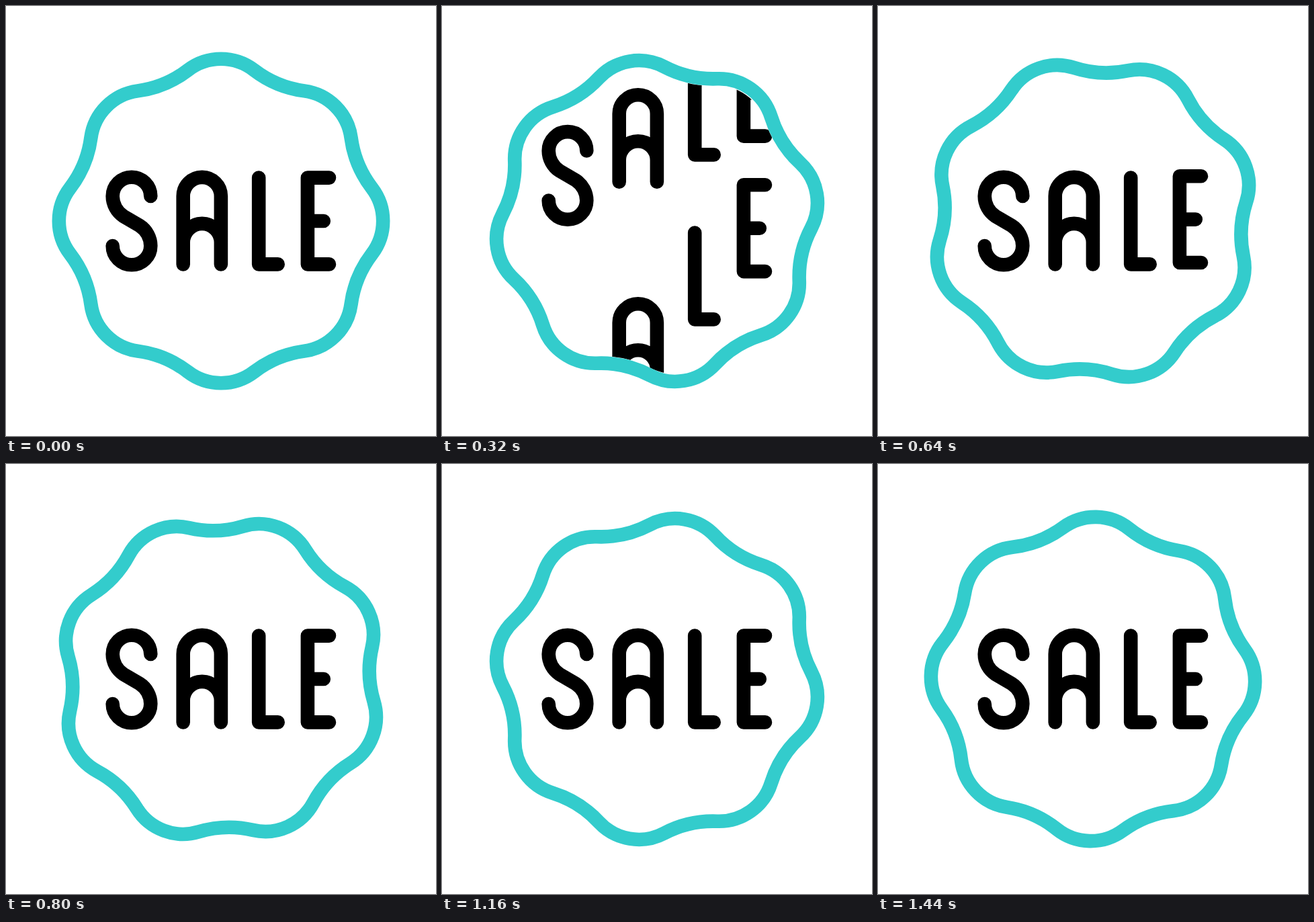
An HTML page without scripts for the animation above (1.48 s loop, 640x640 px).

```html
<!DOCTYPE html>
<html lang="en">
<head>
<meta charset="utf-8">
<title>Sale badge</title>
<style>
  @property --frame { syntax: "<number>"; inherits: true; initial-value: 0; }

  html, body { margin: 0; height: 100%; overflow: hidden; background: #fff; }

  /* One stepped clock drives every part. */
  svg {
    display: block;
    width: 100%;
    height: 100%;
    animation: clock 1480ms steps(37) -2ms infinite;
  }
  @keyframes clock { to { --frame: 37; } }

  path { fill: none; stroke-width: 20.6; stroke-linecap: round; stroke-linejoin: round; }
  .letter path { stroke: #000; }
  .ring { stroke: #3cc; }
  .spin { transform: rotate(calc(var(--frame) * -45deg / 37)); }
  .inset { transform: rotate(calc(var(--frame) * -45deg / 37)) scale(.952); }

  /* Smoothstep from --from, covering --way, starting at --start for --span frames. */
  .letter {
    --x: clamp(0, (var(--frame) - var(--start)) / var(--span), 1);
    --ease: (var(--x) * var(--x) * (3 - 2 * var(--x)));
    transform: translateY(calc(var(--from) + var(--way) * var(--ease)));
  }
  .out { --from: 0px; --way: 360px; --span: 9.7; }
  .in { --from: -326px; --way: 326px; --start: 1; }
</style>
</head>
<body>
<svg viewBox="-320 -320 640 640" role="img" aria-label="SALE">
  <defs>
    <path id="badge" d="M-49.3-224.5
      A81.2 81.2 0 0 1 49.3-224.5 A156.6 156.6 0 0 0 123.9-193.6
      A81.2 81.2 0 0 1 193.6-123.9 A156.6 156.6 0 0 0 224.5-49.3
      A81.2 81.2 0 0 1 224.5 49.3 A156.6 156.6 0 0 0 193.6 123.9
      A81.2 81.2 0 0 1 123.9 193.6 A156.6 156.6 0 0 0 49.3 224.5
      A81.2 81.2 0 0 1-49.3 224.5 A156.6 156.6 0 0 0-123.9 193.6
      A81.2 81.2 0 0 1-193.6 123.9 A156.6 156.6 0 0 0-224.5 49.3
      A81.2 81.2 0 0 1-224.5-49.3 A156.6 156.6 0 0 0-193.6-123.9
      A81.2 81.2 0 0 1-123.9-193.6 A156.6 156.6 0 0 0-49.3-224.5Z"/>
    <path id="s" d="M-104.7-37A28.3 28.3 0 0 0-161.3-37C-161.3-25-155-13.5-145-7L-121 7C-111 13.5-104.7 25-104.7 37A28.3 28.3 0 0 1-161.3 37"/>
    <path id="a" d="M-56.3 64.4V-37a28.1 28.1 0 0 1 56.2 0V64.4M-56.3 32a28.1 28.1 0 0 1 56.2 0"/>
    <path id="l" d="M56.2-64.4V64.4H84.7"/>
    <path id="e" d="M161-64.4H128.9V64.4H161M128.9 0H152.8"/>
    <clipPath id="inside"><use href="#badge" class="inset"/></clipPath>
  </defs>

  <g clip-path="url(#inside)" stroke="#000">
    <use href="#s" class="letter out" style="--start: 1"/>
    <use href="#a" class="letter out" style="--start: 3"/>
    <use href="#l" class="letter out" style="--start: 5"/>
    <use href="#e" class="letter out" style="--start: 7"/>

    <use href="#s" class="letter in" style="--span: 9.9"/>
    <use href="#a" class="letter in" style="--span: 12"/>
    <use href="#l" class="letter in" style="--span: 14"/>
    <use href="#e" class="letter in" style="--span: 15.8"/>
  </g>
  <g class="spin"><use href="#badge" class="ring"/></g>
</svg>
</body>
</html>
```
